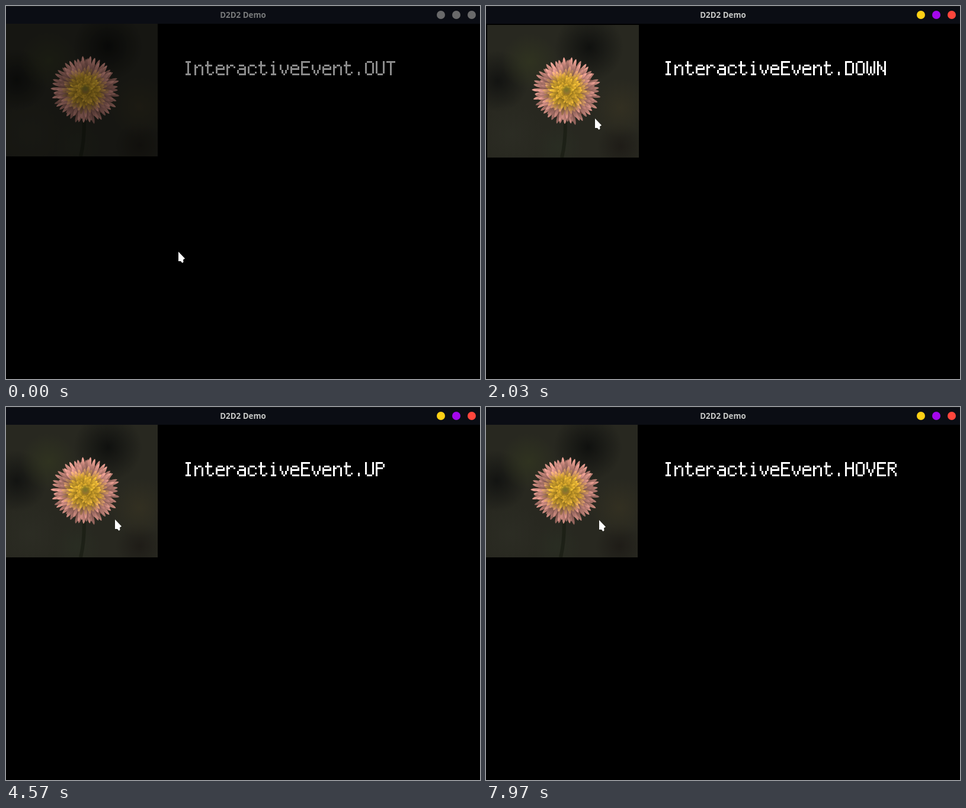
Animation, 800 px wide and 630 px high, one loop 8 s. Source, as an HTML page with a canvas:

```html
<!DOCTYPE html>
<html lang="en">
<head>
<meta charset="utf-8">
<title>D2D2 Demo</title>
<style>
  html, body { margin: 0; width: 100%; height: 100%; overflow: hidden; background: #000; }
  canvas { display: block; width: 800px; height: 630px; }
</style>
</head>
<body>
<canvas id="stage" width="800" height="630"></canvas>
<script>
const ctx = document.getElementById('stage').getContext('2d');
const LOOP = 8000, FOCUS_AT = 1850;
const DOT = 3, ADVANCE = 18;

// Event shown from each time on
const EVENTS = [
  [0, 'OUT'], [1235, 'HOVER'], [1850, 'DOWN'], [2280, 'UP'], [2650, 'DOWN'], [3050, 'UP'],
  [3400, 'DOWN'], [3800, 'UP'], [4220, 'DOWN'], [4480, 'UP'], [5420, 'OUT'], [6550, 'HOVER']
];

// Pointer path: time, x, y
const PATH = [
  [0, 291, 415], [80, 291, 417], [400, 281, 397], [770, 263, 355], [830, 260, 342],
  [1200, 226, 260], [1420, 198, 210], [1600, 184, 190], [5100, 184, 190], [5500, 226, 270],
  [5830, 256, 324], [6050, 262, 339], [6170, 262, 339], [6640, 214, 234], [6950, 191, 191],
  [LOOP, 191, 191]
];

// Pixel letters as straight strokes: columns 0-4, rows a-h
const GLYPHS = {
  I: '1a3a 2a2h 1h3h',
  n: '0c0h 1d1d 2c3c 4d4h',
  t: '1a1g 0c3c 2h3h 4g4g',
  e: '1c3c 0d0g 4d4e 1e4e 1h4h',
  r: '0c0h 1d1d 2c3c 4d4d',
  a: '1c3c 4d4h 1e4e 0f0g 1h3h',
  c: '1c3c 4d4d 0d0g 1h3h 4g4g',
  i: '2a2a 1c2c 2c2h 1h3h',
  v: '0c0e 1f1g 2h2h 3f3g 4c4e',
  E: '0a4a 0a0h 0d3d 0h4h',
  '.': '2g2h',
  O: '1a3a 0b0g 4b4g 1h3h',
  U: '0a0g 4a4g 1h3h',
  T: '0a4a 2a2h',
  D: '0a3a 0a0h 0h3h 4b4g',
  W: '0a0g 4a4g 2d2g 1h1h 3h3h',
  N: '0a0h 4a4h 1c1c 2d2e 3f3f',
  P: '0a3a 4b4c 0d3d 0a0h',
  H: '0a0h 4a4h 0d4d',
  V: '0a0d 1e1f 2g2h 3e3f 4a4d',
  R: '0a3a 4b4c 0d3d 0a0h 2e2e 3f3f 4g4h'
};

function seeded(seed) {
  return () => (seed = (seed * 16807) % 2147483647) / 2147483647;
}

function makePicture(shade) {
  const pic = document.createElement('canvas');
  pic.width = 256;
  pic.height = 224;
  const g = pic.getContext('2d');
  const rnd = seeded(77);

  const glow = (x, y, r, rgb, alpha) => {
    const grad = g.createRadialGradient(x, y, 0, x, y, r);
    grad.addColorStop(0, `rgba(${rgb},${alpha})`);
    grad.addColorStop(1, `rgba(${rgb},0)`);
    g.fillStyle = grad;
    g.fillRect(0, 0, 256, 224);
  };
  g.fillStyle = '#282820';
  g.fillRect(0, 0, 256, 224);
  glow(172, 38, 58, '13,14,13', 0.9);
  glow(18, 95, 52, '15,16,15', 0.85);
  glow(225, 205, 40, '24,20,17', 0.6);
  glow(72, 62, 48, '50,54,32', 0.75);
  glow(225, 140, 50, '54,50,34', 0.75);
  glow(40, 185, 55, '46,47,38', 0.6);
  glow(120, 205, 40, '42,48,36', 0.6);

  g.strokeStyle = 'rgba(24,29,18,.7)';
  g.lineWidth = 6;
  g.beginPath();
  g.moveTo(132, 165);
  g.quadraticCurveTo(132, 200, 126, 224);
  g.stroke();

  // Petals darken towards the base, so each ring stands out from the next
  const petal = (angle, from, to, width, tip, base) => {
    const grad = g.createLinearGradient(from, 0, to, 0);
    grad.addColorStop(0.2, base);
    grad.addColorStop(0.85, tip);
    g.save();
    g.translate(134, 112);
    g.rotate(angle);
    g.beginPath();
    g.moveTo(from, -width * 0.5);
    g.quadraticCurveTo(to * 0.93, -width, to, 0);
    g.quadraticCurveTo(to * 0.93, width, from, width * 0.5);
    g.fillStyle = grad;
    g.fill();
    g.restore();
  };
  g.fillStyle = '#6d4238';
  g.beginPath();
  g.arc(134, 112, 46, 0, 7);
  g.fill();
  for (let ring = 0; ring < 9; ring++) {
    const reach = 57 - ring * 5.7;
    const count = 44 - ring * 3;
    const warm = Math.min(1, Math.max(0, (ring - 2) / 3));
    for (let i = 0; i < count; i++) {
      const angle = (i + ring * 0.5 + rnd() * 0.6) / count * 2 * Math.PI;
      const light = 0.76 + rnd() * 0.36 - Math.sin(angle) * 0.06;
      const tone = k => {
        const mix = (a, b) => Math.round((a + (b - a) * warm) * light * k);
        return `rgb(${mix(215, 238)},${mix(146, 184)},${mix(134, 58)})`;
      };
      petal(angle, reach * 0.5, reach + rnd() * 5 - 3, 4.2 - ring * 0.1, tone(1), tone(0.6));
    }
  }
  glow(134, 110, 30, '240,188,30', 0.5);
  glow(134, 110, 9, '110,115,40', 0.85);

  g.fillStyle = `rgba(0,0,0,${shade})`;
  g.fillRect(0, 0, 256, 224);
  return pic;
}

const brightPic = makePicture(0);
const dimPic = makePicture(0.45);

function drawStroke(s, left, top) {
  const x = +s[0], y = s.charCodeAt(1) - 97;
  const w = s[2] - x + 1, h = s.charCodeAt(3) - 96 - y;
  ctx.fillRect(left + x * DOT, top + y * DOT, w * DOT, h * DOT);
}

function drawLabel(text, color) {
  ctx.fillStyle = color;
  [...text].forEach((ch, i) =>
    GLYPHS[ch].split(' ').forEach(s => drawStroke(s, 300 + i * ADVANCE, 93)));
}

function drawTitleBar(focused) {
  ctx.fillStyle = '#0b0d14';
  ctx.fillRect(0, 0, 800, 30);
  ctx.fillStyle = '#191a1c';
  ctx.fillRect(0, 0, 800, 1);
  ctx.fillStyle = focused ? '#c6c7c6' : '#77797a';
  ctx.font = 'bold 13.33px "Noto Sans", "Open Sans", sans-serif';
  ctx.textAlign = 'center';
  ctx.fillText('D2D2 Demo', 400, 20);
  ['#fdd015', '#a408ec', '#ff463c'].forEach((color, i) => {
    ctx.fillStyle = focused ? color : '#69696a';
    ctx.beginPath();
    ctx.arc(734 + i * 26, 15, 7, 0, 7);
    ctx.fill();
  });
}

function drawPointer(t) {
  const next = Math.max(1, PATH.findIndex(p => p[0] > t));
  const [t0, x0, y0] = PATH[next - 1];
  const [t1, x1, y1] = PATH[next];
  const k = (t - t0) / (t1 - t0);
  ctx.save();
  ctx.translate(Math.round(x0 + (x1 - x0) * k), Math.round(y0 + (y1 - y0) * k));
  ctx.fillStyle = '#fff';
  ctx.fill(new Path2D('M0 0L11 11.5L8 13.5L8.5 17.5L6.5 19L4 16L0 16Z'));
  ctx.restore();
}

function draw(t) {
  const state = EVENTS.filter(e => e[0] <= t).pop()[1];
  const out = state === 'OUT';
  const shift = state === 'DOWN' ? 2 : 0;
  ctx.fillStyle = '#000';
  ctx.fillRect(0, 0, 800, 630);
  drawTitleBar(t >= FOCUS_AT);
  ctx.drawImage(out ? dimPic : brightPic, shift, 30 + shift);
  drawLabel('InteractiveEvent.' + state, out ? '#8b8b8b' : '#fff');
  drawPointer(t);
}

const start = performance.now();
function tick() {
  draw((performance.now() - start) % LOOP);
  requestAnimationFrame(tick);
}
tick();
</script>
</body>
</html>
```
